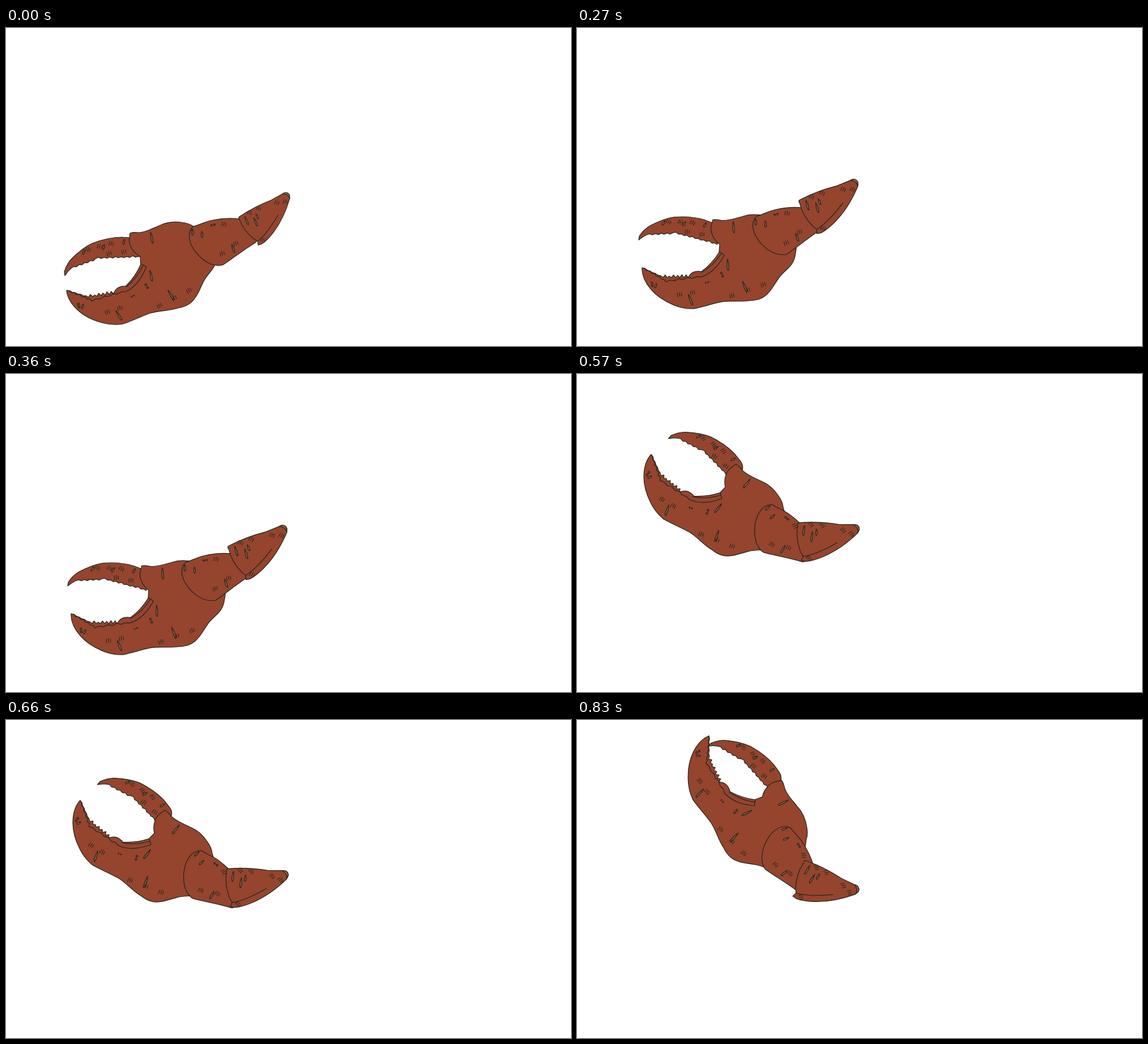
An HTML page for the animation above (0.9 s loop, 998 px wide and 561 px high).

```html
<!DOCTYPE html>
<html lang="en">
<head>
<meta charset="utf-8">
<title>Claw</title>
<style>
  html, body { margin: 0; width: 100%; height: 100%; overflow: hidden; background: #fff; }
  svg { display: block; width: 100%; height: 100%; }
  path { fill: none; stroke: #1d261c; stroke-width: 1.2; stroke-linejoin: round; stroke-linecap: round; }
  .shell { fill: #95442e; }
  .spot { fill: #9a6040; }
  .tuft { stroke-width: 1; }
</style>
</head>
<body>
<svg id="stage" viewBox="0 0 998 561"></svg>
<script>
const LOOP = 900;
const STEP = 150;
const FIRST = 120; // the first pose is held a little shorter

// Seeded random numbers from 0 to 1
let seed = 7;
const random = () => (seed = seed * 16807 % 2147483647) / 2147483647;

// Jagged edge of n teeth from one point to another
function jag(n, x1, y1, x2, y2, height) {
  const length = Math.hypot(x2 - x1, y2 - y1);
  let d = '';
  for (let i = 1; i <= 2 * n; i++) {
    const f = i / (2 * n);
    const out = i % 2 ? height * (.6 + .8 * random()) : 0;
    const x = x1 + (x2 - x1) * f + (y2 - y1) / length * out;
    const y = y1 + (y2 - y1) * f - (x2 - x1) / length * out;
    d += `L${x.toFixed(1)} ${y.toFixed(1)}`;
  }
  return d;
}

const mark = (name, d, place = '') => `<path class="${name}" d="${d}" ${place}/>`;

// n copies of a mark, evenly spread from one point to another
function row(name, d, n, x1, y1, x2, y2, angle) {
  let out = '';
  for (let i = 0; i < n; i++) {
    const f = n > 1 ? i / (n - 1) : 0;
    out += mark(name, d, `transform="translate(${x1 + (x2 - x1) * f} ${y1 + (y2 - y1) * f}) rotate(${angle})"`);
  }
  return out;
}

const spots = (size, ...place) =>
  row('spot', `M${-size / 2} 0Q0 -3 ${size / 2} -1Q${size / 2} 3 ${-size / 2} 0Z`, ...place);
const tufts = (...place) => row('tuft', 'M-3 -3.5H3M-4 0H3M-3 3.5H4', ...place);
const dots = (r, ...place) => row('dot', `M${-r} 0a${r} ${r} 0 1 0 ${2 * r} 0a${r} ${r} 0 1 0 ${-2 * r} 0`, ...place, 0);

// Parts from back to front. Each pose: where the pivot lies, turn in degrees, optional scale.
const PARTS = [
  {
    pivot: [104, 437],
    art: mark('shell', `M104 437L103 430C106 421 110 413 116 407C126 397 137 387 152 380
        C170 373 186 369 205 369L219 370C230 371 237 377 239 404`
        + jag(8, 239, 404, 158, 407, -2) + jag(4, 158, 407, 119, 421, 2) + 'C110 427 108 431 104 437Z')
      + spots(9, 3, 137, 395, 208, 377, 104)
      + tufts(3, 145, 391, 186, 380, 105)
      + tufts(2, 182, 398, 208, 395, 75),
    poses: [[104, 437, 0], [122, 457, -3], [109, 374, 17], [120, 204, 34.3], [161.5, 114, 47.5], [232, 46, 50.3]]
  },
  {
    pivot: [107, 463],
    art: mark('shell', `M219 362Q224 360 235 361C250 359 258 354 270 349C284 342 297 341 311 343
        C321 344 327 347 331 350C346 356 372 370 372 394C372 409 371 414 368 420
        C362 431 354 437 349 447C343 459 340 468 334 476C327 487 316 492 304 494
        C289 499 272 498 255 503C240 508 222 517 207 522C196 524 181 523 170 520
        C151 515 138 508 127 498C115 487 108 474 107 463`
        + jag(4, 107, 463, 146, 475, 1) + jag(6, 146, 475, 190, 469, 4)
        + 'C193 461 198 455 212 455C223 444 231 433 238 417L237 403C225 397 216 383 218 371Z')
      + mark('fold', 'M107 463' + jag(5, 107, 463, 152, 482, 2) + jag(4, 152, 482, 212, 465, 2)
        + 'C230 456 240 441 248 421L238 416M212 457C225 447 235 434 242 419')
      + spots(20, 2, 256, 437, 257, 370, 80)
      + spots(20, 2, 199, 507, 291, 471, 60)
      + spots(8, 1, 135, 491, 135, 491, 110)
      + tufts(2, 179, 501, 201, 494, 75)
      + tufts(3, 271, 490, 323, 463, 62)
      + dots(1.6, 2, 247, 453, 250, 458)
      + dots(.8, 2, 222, 474, 226, 472)
      + dots(1.6, 2, 128, 487, 129, 492),
    poses: [[107, 463, 0], [135, 488, -3.2], [115, 423, 7.9], [97, 231, 34.3], [131, 142, 48.5], [233, 28, 73.5]]
  },
  {
    pivot: [373, 374],
    art: mark('shell', `M331 350C343 347 353 341 365 339C380 336 397 335 413 337
        C424 342 441 359 444 372Q444 376 440 379C420 391 400 407 383 418
        C377 420 369 419 361 416C345 409 333 395 327 382C322 369 322 358 331 350Z`)
      + spots(11, 2, 329, 360, 346, 364, 90)
      + spots(15, 1, 401, 389, 401, 389, 72)
      + tufts(2, 382, 398, 406, 380, 75)
      + tufts(1, 385, 346, 385, 346, 105)
      + dots(1.4, 2, 363, 348, 368, 347),
    poses: [[373, 374, 0], [370, 384, -19], [360, 355, -1.5], [356, 299, 34.6], [356, 278, 48], [370, 238, 68.5]]
  },
  {
    pivot: [450, 329],
    art: mark('shell', `M398 332C414 319 437 304 458 294L479 280C484 275 490 276 493 281L494 288
        C489 313 480 337 468 356C461 367 455 375 447 381L440 384L438 376L431 373
        C418 364 406 352 400 338Q396 335 398 332Z`)
      + mark('spot', 'M479 280C484 275 490 276 493 281L494 288Q492 279 479 280Z')
      + mark('fold', 'M439 376C454 361 465 341 474 322')
      + spots(18, 2, 413, 338, 431, 339, 63)
      + spots(11, 1, 433, 328, 433, 328, 60)
      + tufts(2, 418, 322, 435, 312, 108)
      + tufts(2, 470, 298, 486, 295, 108)
      + tufts(1, 449, 373, 449, 373, 108),
    poses: [[458.5, 334.5, 4.8, .9], [450, 329, 0], [444.5, 311, 11.6], [433, 299, 36], [436, 289.5, 34.7], [433.5, 291, 59]]
  }
];

const stage = document.getElementById('stage');
stage.innerHTML = PARTS.map(part => `<g>${part.art}</g>`).join('');

function draw(time) {
  const index = Math.min(5, Math.floor((time % LOOP - FIRST) / STEP) + 1);
  PARTS.forEach(({ pivot: [px, py], poses }, i) => {
    const [x, y, turn, scale = 1] = poses[index];
    stage.children[i].setAttribute('transform',
      `translate(${x} ${y}) rotate(${turn}) scale(${scale}) translate(${-px} ${-py})`);
  });
}

const begin = performance.now();
function tick() {
  draw(performance.now() - begin);
  requestAnimationFrame(tick);
}
tick();
</script>
</body>
</html>
```
